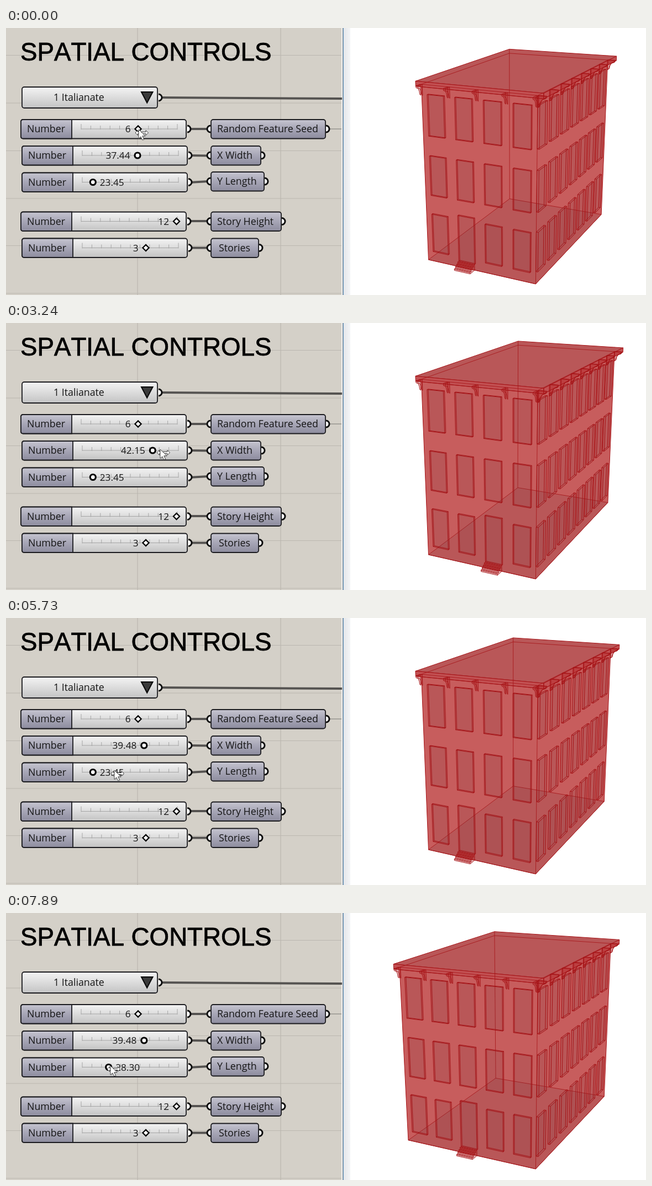
An HTML page for the animation above (8 s loop, 1158 px wide and 484 px high).

```html
<!DOCTYPE html>
<html lang="en">
<head>
<meta charset="utf-8">
<title>Spatial controls</title>
<style>
  html, body { margin: 0; width: 100%; height: 100%; overflow: hidden; background: #fff; }
  svg { display: block; }
  text { font-family: "Open Sans", "Noto Sans", sans-serif; font-size: 17.8px; fill: #151515; }
  .val { font-size: 17.2px; }
  .title { font: 45.7px "Liberation Sans", Arial, sans-serif; font-kerning: none; fill: #000; stroke: #000; stroke-width: .8; }
  .box { stroke: #1b1b1f; stroke-width: 1.8; }
  .port { fill: #fff; stroke: #0c0c0c; stroke-width: 3; }
  .wire { stroke: #555351; stroke-width: 4; }
  .grid { stroke: #bbb7b0; stroke-width: 1.2; fill: none; }
  .tick { stroke: #a5a5a5; stroke-width: 1; fill: none; }
  .knob { fill: #fff; stroke: #000; }
  #building path { stroke-linejoin: round; }
</style>
</head>
<body>
<svg id="stage" width="1158" height="484" viewBox="0 0 1158 484">
  <defs>
    <linearGradient id="light" x2="0" y2="1">
      <stop offset="0" stop-color="#f4f4f4"/><stop offset=".45" stop-color="#dedede"/><stop offset="1" stop-color="#c3c3c3"/>
    </linearGradient>
    <linearGradient id="mauve" x2="0" y2="1">
      <stop offset="0" stop-color="#c6c5d0"/><stop offset=".45" stop-color="#a9a8b8"/><stop offset="1" stop-color="#8d8c9e"/>
    </linearGradient>
    <linearGradient id="edge"><stop offset="0" stop-color="#e4e6ea"/><stop offset="1" stop-color="#f4f5f7"/></linearGradient>
  </defs>
  <rect width="608" height="484" fill="#d4d0c8"/>
  <path class="grid" d="M238 0V484M497 0V484M0 49.5H608M0 136H608M0 222.5H608M0 309H608M0 394.5H608M0 481H608"/>
  <rect x="607" width="2" height="484" fill="#f4f4f2"/>
  <rect x="609" width="1" height="484" fill="#747b84"/>
  <rect x="610" width="1" height="484" fill="#76a9d2"/>
  <rect x="611" width="12" height="484" fill="url(#edge)"/>
  <text class="title" x="26" y="59">SPATIAL CONTROLS</text>
  <g id="panel"></g>
  <g id="building"></g>
  <g id="cursor">
    <path id="arrows" d="M-6 6l4.500-4.500v3h14.500v-3l4.500 4.500l-4.500 4.500v-3h-14.500v3z" fill="#fff" stroke="#3c3c3c" stroke-width="1"/>
    <path d="M1.500 2v16l4-3.600 3 5.500 2.500-1.500-3-5.200h5z" fill="#000" opacity=".16"/>
    <path d="M0 0v16.500l3.900-3.600 2.800 6.100 2.800-1.300-2.800-5.900h5.400z" fill="#fff" stroke="#4a4a4a" stroke-width="1"/>
  </g>
</svg>
<script>
const $ = id => document.getElementById(id);

function el(parent, tag, attrs, text) {
  const node = document.createElementNS("http://www.w3.org/2000/svg", tag);
  for (const k in attrs) node.setAttribute(k, attrs[k]);
  if (text !== undefined) node.textContent = text;
  return parent.appendChild(node);
}

// ---------- control panel ----------
const panel = $("panel");

const box = (x, y, w, h, fill) => el(panel, "rect", { class: "box", x, y, width: w, height: h, rx: 4, fill: `url(#${fill})` });
const label = (x, y, s) => el(panel, "text", { x, y }, s);
const wire = (x1, y1, x2, y2) => el(panel, "line", { class: "wire", x1, y1, x2, y2 });
const port = (x, y, side) =>
  el(panel, "path", { class: "port", d: `M${x} ${y - 6}A6 6 0 0 ${side > 0 ? 1 : 0} ${x} ${y + 6}` });

function knob(round) {
  return round
    ? el(panel, "circle", { class: "knob", r: 5, "stroke-width": 3.2 })
    : el(panel, "path", { class: "knob", d: "M0-5.6L5.6 0 0 5.6-5.6 0z", "stroke-width": 2.2 });
}

function slider(x, cy, round, after) {
  port(x + 301, cy, 1);
  box(x, cy - 17, 299, 34.5, "light");
  el(panel, "path", { class: "box", fill: "url(#mauve)",
    d: `M${x + 92} ${cy - 17}H${x + 4}q-4 0-4 4v26.5q0 4 4 4h88z` });
  label(x + 11, cy + 6, "Number");
  let d = `M${x + 109} ${cy}h174`;
  for (let i = 0; i <= 10; i++) d += `M${x + 109 + i * 17.4} ${cy + 1}v${i % 10 ? -7 : -10}`;
  el(panel, "path", { class: "tick", d });
  const mark = knob(round);
  const text = el(panel, "text", { class: "val", y: cy + 6, "text-anchor": after ? "start" : "end" });
  return (pos, value) => {
    mark.setAttribute("transform", `translate(${pos} ${cy})`);
    text.setAttribute("x", pos + (after ? 12.5 : -13.5));
    text.textContent = value;
  };
}

function param(cy, w, s, dx = 11) {
  port(370, cy, -1);
  port(372 + w, cy, 1);
  box(371, cy - 17, w, 34.5, "mauve");
  label(371 + dx, cy + 6, s);
}

wire(280, 126, 608, 128);
port(276, 126, 1);
box(29, 107, 245, 38, "light");
label(86, 132, "1 Italianate");
el(panel, "path", { d: "M245 116h20.5L255.2 135.5z", fill: "#3a3a3a", stroke: "#0a0a0a", "stroke-width": 2 });
el(panel, "line", { x1: 585, y1: 183, x2: 607, y2: 183, stroke: "#a6a39d", "stroke-width": 2 });
for (const [a, b] of [[183, 183], [231, 231.5], [280, 278], [350, 350], [398.5, 398.5]]) wire(332, a, 365, b);

slider(27, 183, false)(239, "6");
const setX = slider(29, 231, true);
const setY = slider(29, 279.5, true, true);
slider(27, 350.5, false)(308.5, "12");
slider(29, 398.5, false)(253, "3");

param(183, 207, "Random Feature Seed");
param(231, 90, "X Width");
param(278, 96, "Y Length");
param(350.5, 127, "Story Height");
param(398.5, 86, "Stories", 14);

// ---------- building ----------
const ROOF = 36.9, SLAB = 35.95, EAVE = 1.9, DEPTH = 0.4, WIN = 1.75;

// x runs right along the side, y runs left along the front, z is up
function project([x, y, z]) {
  const d = 1 + 0.0064 * x + 0.0034 * y - 0.00235 * z;
  const u = 958.4 + (3.93 * x - 8.93 * y + 0.096 * z) / d;
  const v = 464 - (4.172 * x + 2.026 * y + 8.7 * z) / d;
  return u.toFixed(1) + " " + v.toFixed(1);
}
const line = (...p) => "M" + p.map(project).join("L");
const poly = (...p) => line(...p) + "z";

const building = $("building");
const layer = (fill, stroke, width) => el(building, "path", { fill, stroke, "stroke-width": width });
const INK = "#a51216", SHADE = "rgba(110,55,62,.15)";
const parts = {
  walls: layer("#c75d5d", INK, 1),
  floor: layer(SHADE, INK, 0.8),
  roof: layer("#b95758", INK, 1),
  fascia: layer("#c25052", INK, 1),
  under: layer("none", INK, 0.8),
  panes: layer(SHADE, INK, 1),
  trim: layer("rgba(176,34,36,.35)", INK, 0.9)
};

// wall(s, out, z): s runs along the wall, out points away from it
const front = (s, out, z) => [-out, s, z];
const side = (s, out, z) => [s, -out, z];

function opening(wall, mid, z0, z1) {
  const a = mid - WIN, b = mid + WIN;
  const ring = o => [wall(a, o, z0), wall(b, o, z0), wall(b, o, z1), wall(a, o, z1)];
  const outer = ring(0), inner = ring(-DEPTH);
  return poly(...outer) + poly(...inner) + outer.map((p, i) => line(p, inner[i])).join("");
}

function bracket(wall, s) {
  const profile = [[0, 0], [1.6, 0], [1.5, -0.4], [0.85, -0.65], [0.5, -1.2], [0.35, -1.9], [0, -2.1]];
  const face = t => poly(...profile.map(([o, z]) => wall(t, o, SLAB + z)));
  return face(s - 0.2) + face(s + 0.2);
}

function stairs(mid) {
  const a = mid - WIN, b = mid + WIN, tread = 0.45;
  let d = "";
  for (let i = 0; i < 4; i++) {
    const o = (4 - i) * tread, z = i * 0.3;
    d += poly(front(a, o, z), front(b, o, z), front(b, o, z + 0.3), front(a, o, z + 0.3));
    d += poly(front(a, o, z + 0.3), front(b, o, z + 0.3), front(b, o - tread, z + 0.3), front(a, o - tread, z + 0.3));
  }
  return d + line(front(a, 4 * tread, 0), front(a, 0, 0), front(a, 0, 1.2));
}

function drawBuilding(X, Y) {
  const bays = n => Math.round((n - 2) / 5);
  const nf = bays(Y), ns = bays(X), door = nf + ns - 10;
  const slab = z => [[-EAVE, Y, z], [-EAVE, -EAVE, z], [X, -EAVE, z], [X, Y, z]];
  const top = slab(ROOF), low = slab(SLAB);
  const near = [0, 0, 0], left = [0, Y, 0], right = [X, 0, 0], back = [X, Y, 0];
  const up = ([x, y]) => [x, y, ROOF];
  let panes = "", trim = "";

  for (let i = 0; i < nf; i++) {
    const mid = Y * (1 - (i + 0.5) / nf);
    for (let r = 0; r < 3; r++) {
      if (r || i !== door) panes += opening(front, mid, 2.05 + r * 12, 10.1 + r * 12);
    }
    if (i === door) {
      panes += opening(front, mid, 1.2, 10.85);
      trim += stairs(mid);
    }
  }
  for (let i = 0; i < ns; i++) {
    for (let r = 0; r < 3; r++) panes += opening(side, X * (i + 0.5) / ns, 2.05 + r * 12, 10.1 + r * 12);
  }
  for (let i = ns; i >= 0; i--) trim += bracket(side, X * i / ns);
  for (let i = nf; i >= 0; i--) trim += bracket(front, Y * i / nf);

  const d = {
    walls: poly(left, near, right, up(right), up(near), up(left)),
    floor: poly(left, near, right, back),
    roof: poly(...top),
    fascia: poly(top[0], top[1], low[1], low[0]) + poly(top[1], top[2], low[2], low[1]),
    under: poly(...low) + line(back, up(back)) + line(near, [0, 0, SLAB])
      + line([0, Y, SLAB], [0, 0, SLAB], [X, 0, SLAB]),
    panes, trim
  };
  for (const k in d) parts[k].setAttribute("d", d[k]);
}

// ---------- motion ----------
// each step: time, cursor x, cursor y, X width, Y length, plain cursor
const steps = [[0, 240, 184, 37.44, 23.45]];
const at = (...s) => steps.push(s);
function run(t0, t1, n, from, to, plain) {
  for (let i = 0; i < n; i++) {
    const k = i / (n - 1);
    at(t0 + (t1 - t0) * k, ...from.map((a, j) => a + (to[j] - a) * k), plain);
  }
}
run(120, 480, 4, [239, 192, 37.44, 23.45], [231, 229, 37.44, 23.45]);
at(730, 234, 229, 37.44, 23.45);
run(1350, 1600, 3, [237, 229, 37.44, 23.45], [245, 229, 37.44, 23.45]);
run(1740, 2460, 7, [246, 230, 37.6, 23.45], [261, 229, 39.63, 23.45]);
at(2590, 263, 229, 39.63, 23.45);
at(2740, 277, 229, 41.93, 23.45);
run(3240, 3480, 3, [279, 229, 42.15, 23.45], [280, 229, 42.29, 23.45]);
run(3600, 3970, 4, [272, 229, 42.29, 23.45], [249, 228, 42.29, 23.45]);
at(4090, 246, 228, 42.29, 23.45);
at(4340, 248, 228, 39.98, 23.45);
at(4740, 245, 228, 39.48, 23.45);
run(4990, 5480, 5, [242, 232, 39.48, 23.45], [204, 274, 39.48, 23.45], true);
run(5730, 6090, 4, [196, 276, 39.48, 23.45], [160, 280, 39.48, 23.45]);
run(6210, 6340, 2, [164, 281, 39.48, 23.45], [171, 281, 39.48, 23.45]);
at(6460, 172, 281, 39.48, 23.61);
run(6610, 7090, 5, [173, 281, 39.48, 23.95], [181, 279, 39.48, 26.2]);
at(7490, 187, 278, 39.48, 27.8);
at(7890, 189, 277, 39.48, 28.3);

let shown = null;
function show(step) {
  const [, cx, cy, X, Y, plain] = step;
  $("cursor").setAttribute("transform", `translate(${cx.toFixed(1)} ${cy.toFixed(1)})`);
  $("arrows").setAttribute("visibility", plain ? "hidden" : "visible");
  setX(238 + (X - 37.44) * 5.8, X.toFixed(2));
  setY(157.3 + (Y - 23.45) * 5.85, Y.toFixed(2));
  drawBuilding(X, Y);
}

const start = performance.now();
function tick(now) {
  const t = Math.max(0, now - start) % 8000;
  const step = steps.findLast(s => s[0] <= t);
  if (step !== shown) show(shown = step);
  requestAnimationFrame(tick);
}
show(shown = steps[0]);
requestAnimationFrame(tick);
</script>
</body>
</html>
```
